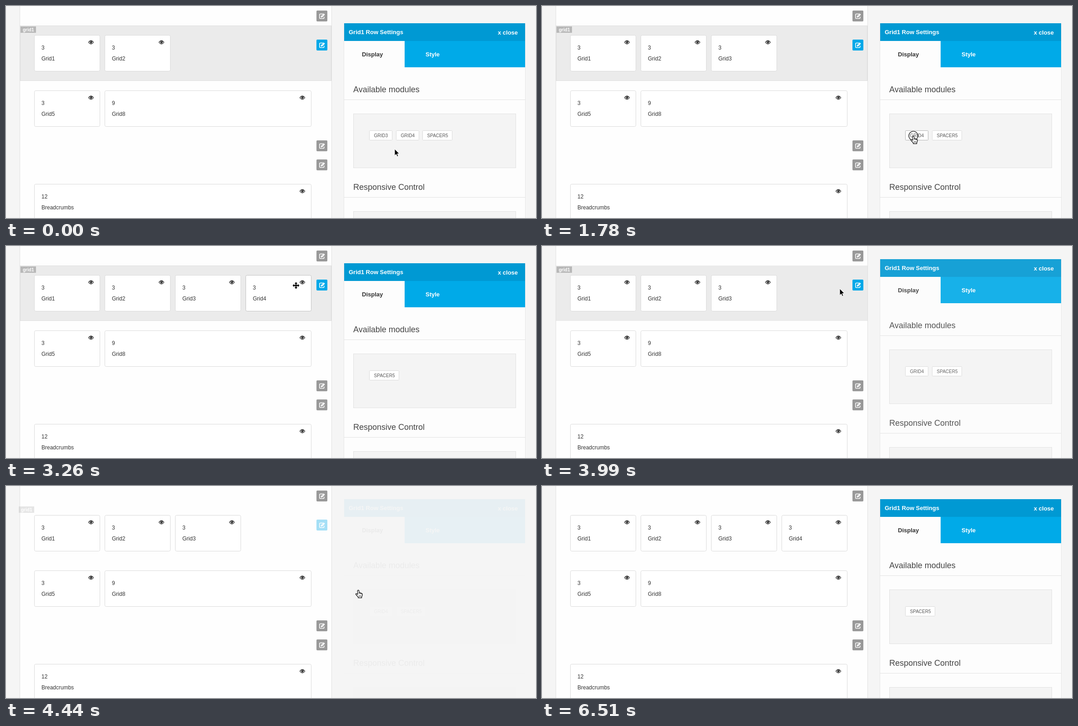
Write an HTML page that moves like this. It is 1166x467 px and loops after 8.01 s.

```html
<!DOCTYPE html>
<html lang="en">
<head>
<meta charset="utf-8">
<title>Grid row editor</title>
<style>
  html, body { margin: 0; width: 100%; height: 100%; overflow: hidden; background: #f5f5f5; }
  svg { display: block; width: 100vw; height: 100vh; font-family: "Liberation Sans", Arial, sans-serif; }
  .s { font-size: 12px; fill: #333; }
  .b { font-size: 13px; font-weight: bold; fill: #fff; }
  .h { font-size: 18px; fill: #444; }
  .t { font-size: 10px; fill: #555; }
</style>
</head>
<body>
<svg id="stage" viewBox="0 0 1166 467"></svg>
<script>
const LOOP = 8010;
const stage = document.getElementById('stage');

const text = (cls, x, y, str, more = '') => `<text class="${cls}" x="${x}" y="${y}" ${more}>${str}</text>`;
const fill = (x, y, w, h, c, more = '') => `<rect x="${x}" y="${y}" width="${w}" height="${h}" fill="${c}" ${more}/>`;
// One-pixel outline lying inside the given bounds
const box = (x, y, w, h, c, line, r = 0) =>
  fill(x + .5, y + .5, w - 1, h - 1, c, `stroke="${line}" rx="${r}"`);
const group = (x, y, inner, alpha = 1) =>
  alpha > 0 ? `<g transform="translate(${x} ${y})" opacity="${alpha}">${inner}</g>` : '';

const eye = `<path d="M-5.6 0Q0-7.6 5.6 0Q0 7.6-5.6 0Z" fill="#fff" stroke="#333" stroke-width="1.2"/>
  <circle cy="-.4" r="2.8" fill="#333"/><path d="M-1.4-.6Q-1.3-1.9 0-2" fill="none" stroke="#fff" stroke-width=".8"/>`;

const edit = color => fill(0, 0, 24, 24, color, 'rx="2"') +
  `<path d="M14.2 7.6H8.6Q6.8 7.6 6.8 9.4V15.8Q6.8 17.6 8.6 17.6H15Q16.8 17.6 16.8 15.8V13.6" fill="none" stroke="#fff" stroke-width="1.5"/>
  <path d="M9.9 14.9V12.2L15.9 6.2L18.6 8.9L12.6 14.9Z" fill="#fff"/>
  <path d="M11.2 12.9L15.6 8.5" stroke="${color}" stroke-width=".7"/>`;

const card = (x, y, w, size, name, alpha = 1, hover = false) => group(x, y,
  box(0, 0, w, 80, '#fff', hover ? '#c2c2c2' : '#dadada', 3) +
  text('s', 16, 32, size) + text('s', 16, 56, name) + group(w - 20, 16, eye), alpha);

const cursors = {
  arrow: `<path d="M0 0V14.5L3.4 11.4L5.6 16.6L8 15.6L5.8 10.5H10.2Z" fill="#000" stroke="#fff" stroke-width="1"/>`,
  hand: `<path d="M-1.7 1.6Q-.2-.9 1.5 1.4L2 6.3Q3.6 5.2 4.6 6.9Q6 6 6.9 7.7Q8.9 7.2 8.9 9.4V12L7.5 15V17.4H-.2V15.6L-2.6 13L-5.5 9.5Q-5.8 7.5-3.6 8.1L-1.2 10Z"
    fill="#fff" stroke="#000" stroke-width="1.2" stroke-linejoin="round"/>
    <path d="M2 6.3V9M4.6 7V9.4M6.9 7.8V9.8M1.6 12V15M3.6 12V15M5.6 12V15" stroke="#000" stroke-width=".8"/>`,
  move: `<path d="M0-7.5L3.2-4H1.2V-1.2H4V-3.2L7.5 0L4 3.2V1.2H1.2V4H3.2L0 7.5L-3.2 4H-1.2V1.2H-4V3.2L-7.5 0L-4-3.2V-1.2H-1.2V-4H-3.2Z"
    fill="#000" stroke="#fff" stroke-width="1.4" paint-order="stroke"/>`
};

const names = { 3: 'GRID3', 4: 'GRID4', 5: 'SPACER5' };

function modules(list, hover) {
  let x = 799;
  return [...list].map((id, i) => {
    const w = id === '5' ? 65.5 : 50.7;
    const left = Math.round(x);
    x += w + 7.9;
    return box(left, 274, Math.round(left + w) - left, 22, '#fff', hover && !i ? '#b4b4b4' : '#dadada', 1) +
      text('t', left + 10.6, 288.5, names[id]);
  }).join('');
}

const panel = s => group(0, s.top,
  box(743, 38, 400, 460, '#fdfdfd', '#e6e6e6') +
  fill(744, 38, 398, 39, '#0099d3') + fill(744, 77, 398, 58, '#00aae8') + fill(744, 77, 133, 58, '#fdfdfd') +
  text('b', 754, 62, 'Grid1 Row Settings') + text('b', 1082, 63, 'x close') +
  text('b', 783, 111, 'Display', 'style="fill:#333"') + text('b', 923, 111, 'Style') +
  text('h', 764, 190, 'Available modules') + fill(744, 206, 398, 1, '#e2e2e2') +
  box(764, 237, 358, 120, '#f4f4f4', '#e2e2e2') + modules(s.list, s.over) +
  text('h', 764, 405, 'Responsive Control') + fill(744, 421, 398, 1, '#e2e2e2') +
  box(764, 452, 358, 60, '#f4f4f4', '#e2e2e2'), s.panel);

function draw(s) {
  const rowFill = s.row ? fill(31, 43, 685, 122, '#ebebeb') : '';
  const rowLine = s.line ? box(31, 43, 685, 122, 'none', '#dedede') : '';
  const label = fill(0, 0, 34, 14, '#b8b8b8') + text('t', 5, 11, 'grid1', 'style="fill:#fff;font-weight:bold"');
  stage.innerHTML =
    fill(0, 0, 1166, 467, '#f5f5f5') + box(30, -5, 687, 480, '#fefefe', '#e0e0e0') +
    rowFill + rowLine + group(s.labelX, 45, label, s.tools) +
    group(683, 74, edit('#00a8e8'), s.tools) +
    [10, 296, 338].map(y => group(683, y, edit('#999'))).join('') +
    card(62, 64, 145, 3, 'Grid1') + card(217, 64, 145, 3, 'Grid2') +
    card(372, 64, 145, 3, 'Grid3', s.g3, s.card === 3) +
    card(527, 64, 145, 3, 'Grid4', s.g4, s.card === 4) +
    card(62, 186, 145, 3, 'Grid5') + card(217, 186, 455, 9, 'Grid8') +
    card(62, 392, 610, 12, 'Breadcrumbs') +
    panel(s) +
    (s.ring ? `<circle cx="${s.x}" cy="${s.y}" r="10" fill="none" stroke="#000" stroke-width="1.2" opacity="${s.ring}"/>` : '') +
    (s.cur ? group(s.x, s.y, cursors[s.cur]) : '');
}

const start = {
  cur: 'arrow', x: 855, y: 315, ring: 0, list: '345', over: false, card: 0, g3: 0, g4: 0,
  row: true, line: true, labelX: 32, tools: 1, top: 0, panel: 1
};

// Each step: time, pointer x, pointer y, other changes
const steps = [
  [0, 855, 315],
  [150, 850, 310],
  [300, 835, 298],
  [450, 821, 288, { cur: 'hand', over: true }],
  [600, 817, 286, { ring: 1 }],
  [740, 817, 286, { ring: .5 }],
  [890, 817, 286, { ring: 0, g3: .5 }],
  [1040, 817, 286, { g3: 1, list: '45' }],
  [1340, 819, 289],
  [1490, 821, 292],
  [1640, 818, 287],
  [1780, 817, 286, { ring: 1 }],
  [1930, 817, 286, { ring: 0, g4: .5 }],
  [2080, 806, 276, { g4: 1, list: '5' }],
  [2230, 650, 175, { cur: 'arrow', over: false }],
  [2370, 492, 108, { cur: 'move', card: 3 }],
  [2820, 510, 104],
  [2970, 560, 97, { card: 4 }],
  [3120, 612, 90],
  [3260, 638, 87],
  [3410, 651, 81, { cur: 'hand' }],
  [3560, 651, 81, { ring: 1 }],
  [3700, 651, 82, { ring: 0, g4: .4 }],
  [3850, 655, 94, { cur: 'arrow', g4: 0, card: 0 }],
  [3990, 655, 94, { line: false, top: -9, list: '45', panel: .9 }],
  [4140, 655, 94, { panel: .69 }],
  [4290, 705, 155, { panel: .35 }],
  [4440, 775, 229, { cur: 'hand', row: false, labelX: 28, tools: .35, panel: .05 }],
  [4590, 800, 256, { tools: 0, panel: .35 }],
  [4740, 811, 267, { over: true, panel: .75 }],
  [4890, 814, 269, { panel: 1 }],
  [5180, 815, 270],
  [5330, 815, 270, { ring: 1 }],
  [5480, 815, 270, { ring: 0, g4: .5 }],
  [5630, 815, 270, { g4: 1, list: '5' }],
  [6220, 880, 330, { cur: 'arrow', over: false }],
  [6360, 1031, 452],
  [6510, 0, 0, { cur: '' }]
];

let state = start;
const states = steps.map(([, x, y, more]) => state = { ...state, x, y, ...more });

let shown = -1;
function tick() {
  const t = performance.now() % LOOP;
  let i = steps.length - 1;
  while (steps[i][0] > t) i--;
  if (i !== shown) draw(states[shown = i]);
  requestAnimationFrame(tick);
}
tick();
</script>
</body>
</html>
```
